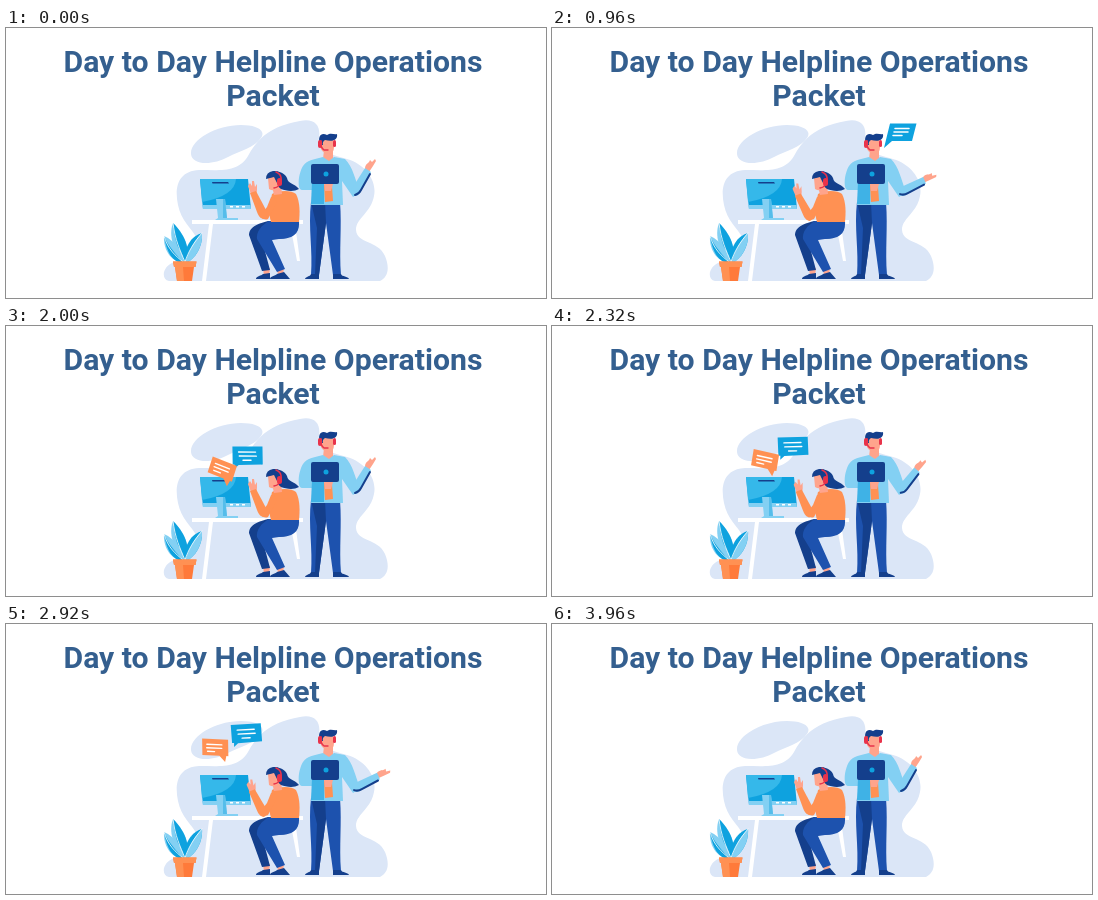
Recreate the animation shown at these times as an HTML page. Size 540 by 270 pixels, loop 4000 ms.

```html
<!DOCTYPE html>
<html lang="en">
<head>
<meta charset="utf-8">
<title>Helpline</title>
<style>
  html, body { margin: 0; width: 100%; height: 100%; overflow: hidden; background: #fff; }
  svg { display: block; width: 100%; height: 100%; }
  text { font: 700 30.2px Roboto, sans-serif; fill: #345f8f; text-anchor: middle; }
  .pale { fill: #dbe6f7; }
  .white { fill: #fff; }
  .sky { fill: #0ea2df; }
  .light { fill: #83d0f3; }
  .blue { fill: #1d52ae; }
  .deep { fill: #143f8c; }
  .orange { fill: #ff9153; }
  .skin { fill: #ffa48c; }
  .red { fill: #e8334b; }
  .line { fill: none; stroke-linecap: round; stroke-linejoin: round; }
</style>
</head>
<body>
<svg viewBox="0 0 540 270">
  <text x="267" y="44">Day to Day Helpline Operations</text>
  <text x="267" y="78">Packet</text>

  <g id="backdrop" class="pale">
    <path d="M185 126C184 112 210 97 235 97C252 97 260 103 255 110C249 119 234 123 222 129C208 137 186 138 185 126Z"/>
    <path d="M294 93C309 90 315 98 313 110C311 123 326 127 341 131C361 137 371 154 368 168C365 185 350 190 350 202C351 216 372 212 379 228C384 240 382 249 374 253H163C154 251 157 237 169 234C185 230 196 224 191 211C186 200 175 193 172 177C168 158 173 143 193 142C213 142 232 145 242 128C252 108 269 97 294 93Z"/>
  </g>

  <g id="plant">
    <path class="light" d="M178 235C168 224 162 208 167 195C178 206 185 220 180 235Z"/>
    <path class="sky" d="M179 235C172 222 168 210 167 195C178 206 185 220 180 235Z"/>
    <path class="light" d="M177 235C167 234 157 224 158 208C169 213 177 223 178 235Z"/>
    <path class="sky" d="M177 235C167 234 161 226 158 208C164 222 172 227 177 235Z"/>
    <path class="sky" d="M178 235C178 219 185 208 196 205C197 219 189 231 180 235Z"/>
    <path class="light" d="M179 235C183 222 188 213 196 205C197 219 189 231 180 235Z"/>
    <path class="line" stroke="#fff" stroke-width=".8" d="M167 195C169 212 174 222 179 234M158 208C162 222 170 228 177 234M196 205C188 214 182 224 179 234"/>
    <path fill="#ff7a3a" d="M167 233.500H190.500L189.500 239H188L186 253H171L169 239H168Z"/>
    <path class="orange" d="M167 233.500H190.500L189.500 239H168ZM169 239H177L178 253H171Z"/>
  </g>

  <g id="man">
    <path class="blue" d="M305 174H334C336 199 333 222 335 247H327L320 195L313 247H305C307 222 302 200 305 174Z"/>
    <path class="deep" d="M305 174H319L320 195L313 247H309L311 200Z"/>
    <path class="deep" d="M305 246H313V251H299C300 248 304 249 305 246ZM327 246H335C336 249 342 248 343 251H327Z"/>
    <path class="skin" d="M318 122H327V131L322 135L317 131Z"/>
    <path class="light" d="M317 129L323 133L328 129L339 131C347 139 349 151 354 164L347 169L336 153L337 177H305L307 162H296C291 162 292 146 297 138C301 132 309 131 317 129Z"/>
    <path fill="#3fb2e6" d="M306 154H318V176H305Z"/>
    <path class="skin" d="M314 113Q316 108 327 110L328 119Q328 126 322 126Q315 125 314 117Z"/>
    <path class="deep" d="M314 117C311 107 316 104 321 107C325 104 328 107 331 106C332 112 327 114 319 112Q316 114 317 117Z"/>
    <path class="line" stroke="#e8334b" stroke-width="1.400" d="M315 113Q314 119 318 122L322 122"/>
    <rect class="red" x="312" y="112" width="4" height="8" rx="2"/>
    <rect class="red" x="327" y="112" width="3" height="7" rx="1.500"/>
    <path class="orange" d="M318 157L326 158L327 173L319 174Z"/>
    <rect class="deep" x="305" y="136" width="28" height="20" rx="2"/>
    <circle class="sky" cx="320" cy="146" r="2.500"/>
    <path class="skin" d="M318 156H327L325 163H319Z"/>
  </g>
  <g id="forearm">
    <path class="skin" d="M359 141C359 135 363 136 364 132L366 134L369 131L370 133L367 138L363 144Z"/>
    <path class="light" d="M345 162L359 140L365 144L354 165C350 170 345 168 345 162Z"/>
    <path class="line" stroke="#143f8c" stroke-width="2" d="M349 167Q353 166 355 162L364 146"/>
  </g>

  <g id="desk" class="white">
    <path d="M186 192H297V196H289L294 233H291L284 196H207L200 253H196L203 196H186Z"/>
  </g>
  <g id="monitor">
    <path class="sky" d="M194 151H242L245 181H197Z"/>
    <path fill="#35b8ea" d="M194 151H230Q229 168 196 174Z"/>
    <path class="light" d="M196.500 177H244.500L245 181H197Z"/>
    <path class="deep" d="M206 154H222L223 155.500H206.500Z"/>
    <path class="light" d="M210 171H219L221 190H232V192H209L212 190Z"/>
    <path fill="#55bdea" d="M217 171H219L221 190H217Z"/>
    <path class="white" d="M224 178H227V179.500H224ZM230 178H233V179.500H230ZM236 178H239V179.500H236Z"/>
  </g>

  <g id="woman">
    <path class="skin" d="M257 240H264L263 248H258ZM271 240L278 239L277 248H272Z"/>
    <path class="deep" d="M284 193H262C250 196 243 200 243 207L256 243L264 242L256 212L282 210Z"/>
    <path class="blue" d="M263 193H293C294 206 287 211 273 211L266 212L279 241L271 244L251 211C250 203 256 197 263 193Z"/>
    <path class="deep" d="M257 246L264 245V251H250C250 248 255 248 257 246ZM271 246L278 244L284 251H264C264 248 269 248 271 246Z"/>
    <path class="orange" d="M266 166C272 162 286 162 290 166C294 174 294 184 293 194H265C262 185 264 175 266 166Z"/>
    <path class="skin" d="M266 158L275 156L276 166L268 167Z"/>
    <path class="deep" d="M262 147C267 141 278 143 281 150C282 156 288 155 293 161C288 164 280 163 275 161L267 154Z"/>
    <path class="skin" d="M262 150L270 148Q275 151 272 160Q268 164 263 161Z"/>
    <path class="deep" d="M260 151Q260 144 267 143Q276 142 276 151L271 155L268 149Z"/>
    <path class="line" stroke="#e8334b" stroke-width="1.500" d="M270 144Q276 146 275 153Q274 159 268 160"/>
    <rect class="red" x="271" y="150" width="5" height="8" rx="2.500"/>
    <path class="orange" d="M265 169Q271 169 270 176L262 191Q258 193 254 188L261 179Z"/>
  </g>
  <g id="arm">
    <path class="skin" d="M245 166L242 158L244 155L246 158L246 153L248 153L249 159L251 156L251 162L250 168Z"/>
    <path class="orange" d="M244 165L250 163L260 182Q263 190 257 191Q253 190 251 184Z"/>
  </g>

  <g id="bubbleMan">
    <path class="sky" d="M-11-10.500H15.500L11 7H-9L-17 14Z"/>
    <path class="line" stroke="#fff" stroke-width="1.500" d="M-6-5.500H8M-7-2H7M-8 1.500H1"/>
  </g>
  <g id="bubbleBlue">
    <path class="sky" d="M-15.500-9L14.500-11L16 7L-8 9L-12 13L-12 9H-14Z"/>
    <path class="line" stroke="#fff" stroke-width="1.400" d="M-9-4L8-5M-8 0L9-1M-4 4L4 3.500"/>
  </g>
  <g id="bubbleOrange">
    <path class="orange" d="M-13-9.500L13-9.500L14 7H12L11 13L5 7H-12Z"/>
    <path class="line" stroke="#fff" stroke-width="1.400" d="M-8-4H7M-8-0.500H7M-7 3H0"/>
  </g>
</svg>
<script>
const LOOP = 4000;
const part = id => document.getElementById(id);
const ramp = (t, from, to) => Math.min(1, Math.max(0, (t - from) / (to - from)));
const mix = (a, b, p) => a + (b - a) * p;
const easeOut = p => 1 - (1 - p) ** 2;

function place(id, x, y, angle, scale, opacity) {
  part(id).setAttribute('transform', `translate(${x} ${y}) rotate(${angle}) scale(${scale})`);
  part(id).setAttribute('opacity', opacity);
}

function draw(t) {
  // Both arms swing twice per loop.
  const swing = (1 - Math.cos(t / 2000 * 2 * Math.PI)) / 2;
  part('forearm').setAttribute('transform', `rotate(${33 * swing} 350 165)`);
  part('arm').setAttribute('transform', `translate(0 ${2 * swing}) rotate(${-3 * swing} 257 187)`);

  const manIn = ramp(t, 480, 760);
  place('bubbleMan', 349, 106 - (t - 960) * 0.0081, 0,
    mix(0.5, 1, easeOut(manIn)), manIn * (1 - ramp(t, 1650, 1850)));

  const rise = easeOut(ramp(t, 1640, 3400));
  const deskIn = ramp(t, 1640, 1960);
  const scale = mix(0.5, 1, easeOut(deskIn));
  place('bubbleBlue', mix(242, 240, rise), mix(144, 107.5, rise), mix(6, 0, rise),
    scale, deskIn * (1 - ramp(t, 3000, 3360)));
  place('bubbleOrange', mix(219.8, 207.8, rise), mix(157, 122, rise), mix(34, 0, rise),
    scale, deskIn * (1 - ramp(t, 3000, 3440)));
}

function frame() {
  draw(performance.now() % LOOP);
  requestAnimationFrame(frame);
}
frame();
</script>
</body>
</html>
```
